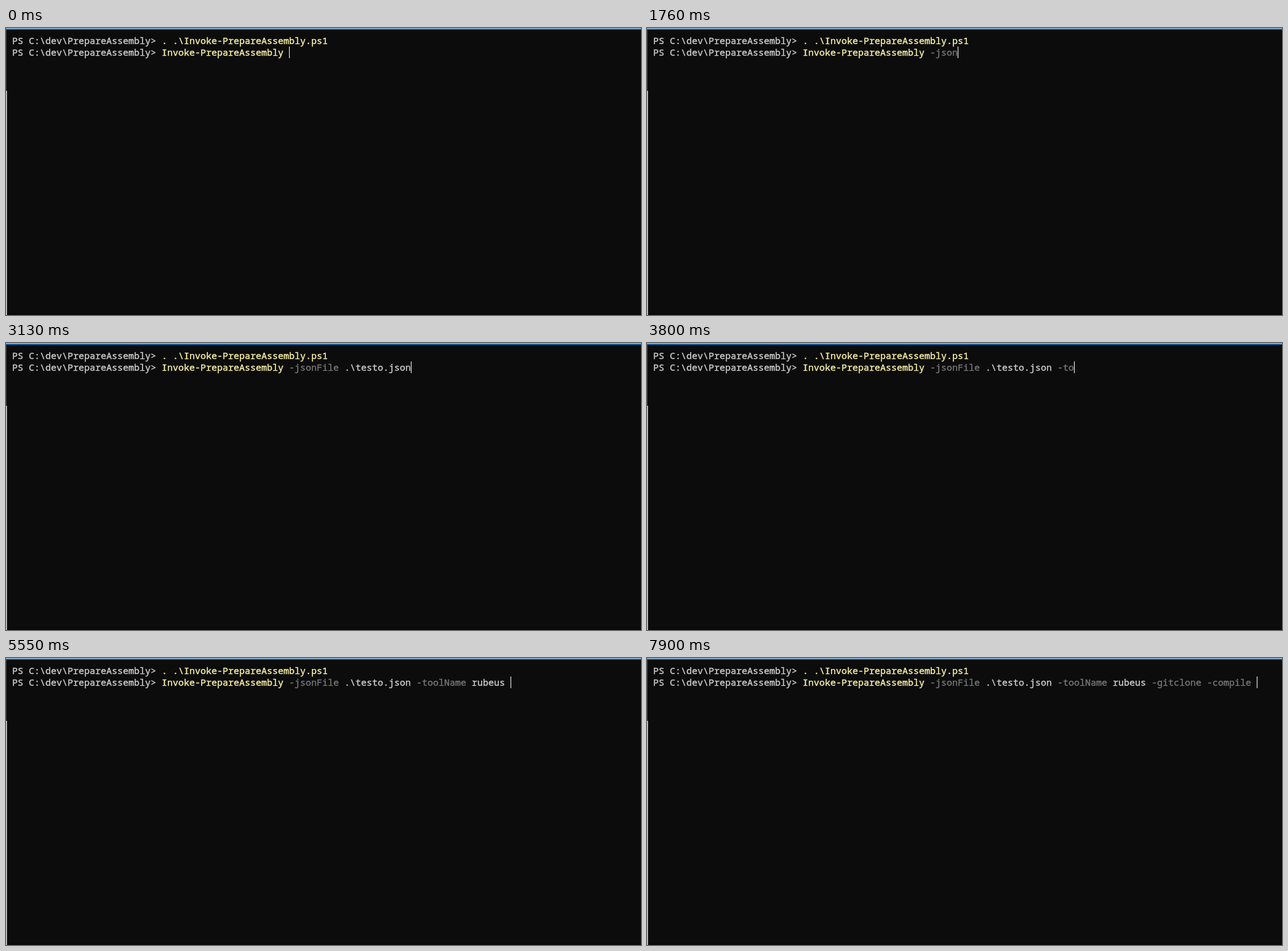
Recreate the animation shown at these times as an HTML page. Size 1032 by 466 pixels, loop 8000 ms.

```html
<!DOCTYPE html>
<html lang="en">
<head>
<meta charset="utf-8">
<title>Terminal</title>
<style>
  html, body { margin: 0; width: 100%; height: 100%; overflow: hidden; background: #0c0c0c; }
  svg { display: block; }
  text {
    font: 500 15px "Noto Sans Mono", "DejaVu Sans Mono", monospace;
    font-variant-ligatures: none;
    white-space: pre;
    color: #cccccc;
    fill: currentColor;
    stroke: currentColor;
    stroke-width: 0.4px;
  }
  .cmd { color: #f9f1a5; }
  .param { color: #767676; }
</style>
</head>
<body>
<svg width="1032" height="466" viewBox="0 0 1032 466" shape-rendering="crispEdges">
  <rect width="1032" height="466" fill="#0c0c0c"/>
  <rect y="463" width="1032" height="3" fill="#0c070b"/>
  <rect y="3" width="1" height="99" fill="#3c3c3c"/>
  <rect y="102" width="1" height="364" fill="#e6e6e6"/>
  <rect x="1" y="102" width="1" height="364" fill="#6a6a6a"/>
  <rect width="1032" height="1" fill="#c8d0d8"/>
  <rect y="1" width="1032" height="2" fill="#1c70b8"/>
  <text x="10" y="26">PS C:\dev\PrepareAssembly&gt;</text>
  <text x="253" y="26" class="cmd">. .\Invoke-PrepareAssembly.ps1</text>
  <text x="10" y="45">PS C:\dev\PrepareAssembly&gt;</text>
  <text x="253" y="45" class="cmd">Invoke-PrepareAssembly</text>
  <g id="typed"></g>
  <rect id="cursor" y="30" width="1" height="19" fill="#ffffff"/>
</svg>
<script>
const LOOP = 8000, BLINK = 530, CELL = 9, LEFT = 460, BASELINE = 45;

// Evenly paced keys from start to end; Tab completes the last word.
const bursts = [
  { start: 1130, keys: "-" },
  { start: 1330, end: 1830, keys: "json\t", word: "-jsonFile" },
  { start: 2100, end: 2370, keys: " t" },
  { start: 2770, end: 3130, keys: "est\t", word: ".\\testo.json" },
  { start: 3460, end: 3800, keys: " -to" },
  { start: 3930, end: 4070, keys: "ol\t", word: "-toolName" },
  { start: 4540, keys: " " },
  { start: 4870, end: 5220, keys: "rube" },
  { start: 5420, end: 5550, keys: "us " },
  { start: 5890, keys: "-" },
  { start: 6290, end: 6360, keys: "gi" },
  { start: 6560, end: 6620, keys: "t\t", word: "-gitclone" },
  { start: 6960, keys: " " },
  { start: 7230, end: 7570, keys: "-com\t", word: "-compile" },
  { start: 7900, keys: " " }
];

const typed = document.getElementById("typed");
const cursor = document.getElementById("cursor");
let shown = null;

function stateAt(now) {
  let line = "", lastKey = 0;
  for (const { start, end = start, keys, word } of bursts) {
    const gap = (end - start) / Math.max(1, keys.length - 1);
    for (let i = 0; i < keys.length; i++) {
      const time = start + i * gap;
      if (time > now) return { line, lastKey };
      line = keys[i] === "\t" ? line.replace(/\S+$/, () => word) : line + keys[i];
      lastKey = time;
    }
  }
  return { line, lastKey };
}

function makeWord({ 0: word, index }) {
  const node = document.createElementNS("http://www.w3.org/2000/svg", "text");
  node.setAttribute("x", LEFT + index * CELL);
  node.setAttribute("y", BASELINE);
  if (word[0] === "-") node.setAttribute("class", "param");
  node.textContent = word;
  return node;
}

function tick() {
  const now = performance.now() % LOOP;
  const { line, lastKey } = stateAt(now);
  if (line !== shown) {
    shown = line;
    typed.replaceChildren(...Array.from(line.matchAll(/\S+/g), makeWord));
    cursor.setAttribute("x", LEFT + line.length * CELL);
  }
  const lit = Math.floor((now - lastKey) / BLINK) % 2 === 0;
  cursor.setAttribute("visibility", lit ? "visible" : "hidden");
  requestAnimationFrame(tick);
}
tick();
</script>
</body>
</html>
```
